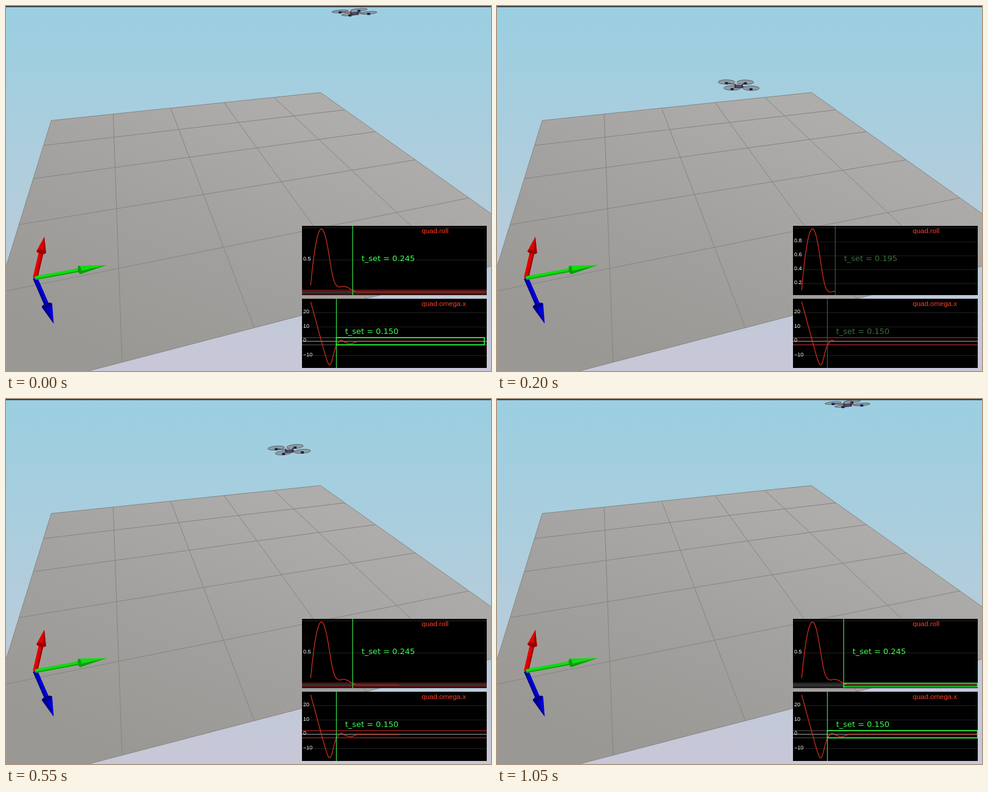
An HTML page with a canvas that plays this animation: 798 by 601 pixels, repeating every 1.1 s.

```html
<!DOCTYPE html>
<html lang="en">
<head>
<meta charset="utf-8">
<title>Quadcopter settling</title>
<style>
  html, body { margin: 0; width: 100%; height: 100%; overflow: hidden; background: #9acde0; }
  canvas { display: block; }
</style>
</head>
<body>
<canvas id="stage" width="798" height="601"></canvas>
<script>
const W = 798, H = 601, LOOP = 1100, TICK = 50, DT = .005;
const SANS = '"Liberation Sans", Arial, sans-serif';
const ctx = document.getElementById('stage').getContext('2d');

const clamp = (v, lo, hi) => Math.max(lo, Math.min(hi, v));
const mix = (a, b, k) => a + (b - a) * k;
const bell = (x, mid, width) => Math.exp(-(((x - mid) / width) ** 2));

const PACE = [[1, .015], [4, .195], [7, .335], [13, .67], [16, .82], [19, 1.005]];

function simTime(tick) {
  if (tick === 0) return .99;
  const step = tick - (tick > 4) - (tick > 14);   // two steps are held twice as long
  const i = PACE.findIndex(p => p[0] >= step);
  if (i === 0) return PACE[0][1];
  const [a, ta] = PACE[i - 1], [b, tb] = PACE[i];
  return Math.round(mix(ta, tb, (step - a) / (b - a)) / DT) * DT;
}

// Roll rate: constant braking that fades out, then a small wobble.
function omega(t) {
  const brake = (29.9 - 452 * t) / (1 + Math.exp((t - .126) / .01));
  return brake + 1.2 * bell(t, .177, .012) - 1.7 * bell(t, .23, .03);
}

// Integrate backwards from rest, so that the roll angle settles at zero.
const history = [];
for (let i = Math.round(1.1 / DT), roll = 0; i > 0; i--) {
  const t = i * DT;
  history.unshift({ t, roll, omega: omega(t) });
  roll -= 1.04 * DT * (omega(t) + omega(t - DT)) / 2;
}

const plots = [
  { top: 362, title: 'quad.roll', key: 'roll', band: .027, settle: .245 },
  { top: 482, title: 'quad.omega.x', key: 'omega', band: 2.5, settle: .15 }
];

function poly(pts, fill) {
  ctx.beginPath();
  pts.forEach(p => ctx.lineTo(p[0], p[1]));
  ctx.closePath();
  ctx.fillStyle = fill;
  ctx.fill();
}

function line(x0, y0, x1, y1, color, width = 1) {
  ctx.beginPath();
  ctx.moveTo(x0, y0);
  ctx.lineTo(x1, y1);
  ctx.strokeStyle = color;
  ctx.lineWidth = width;
  ctx.stroke();
}

function text(str, x, y, color, font) {
  ctx.font = font;
  ctx.fillStyle = color;
  ctx.fillText(str, x, y);
}

function gradient(x0, y0, x1, y1, ...colors) {
  const g = ctx.createLinearGradient(x0, y0, x1, y1);
  colors.forEach((c, i) => g.addColorStop(i / (colors.length - 1), c));
  return g;
}

// Perspective map of the unit square onto the floor.
function floorPoint(u, v) {
  const w = 1 + .1937 * u - .6119 * v;
  return [.5 + (74 + 543.1 * u - 101.3 * v) / w, .5 + (188 - 18.5 * u + 65.85 * v) / w];
}

function drawScene() {
  ctx.fillStyle = gradient(0, 0, 0, H, '#9acfe1', '#b1cddc', '#c9c7d7');
  ctx.fillRect(0, 0, W, H);
  poly([floorPoint(0, 0), floorPoint(1, 0), floorPoint(1, 1), floorPoint(0, 1)],
       gradient(430, 142, 250, 601, '#afadab', '#a3a19f', '#9a9894'));
  for (let k = 0; k <= 5; k++) {
    line(...floorPoint(k / 5, 0), ...floorPoint(k / 5, 1), '#868481');
    line(...floorPoint(0, k / 5), ...floorPoint(1, k / 5), '#868481');
  }
}

function drawArrow(neck, tip, shaft, cone, color, dark) {
  const [ox, oy] = [48, 448], [nx, ny] = neck;
  const dx = tip[0] - nx, dy = tip[1] - ny, len = Math.hypot(dx, dy);
  const px = -dy / len, py = dx / len;
  const at = (x, y, r) => [x + px * r, y + py * r];
  const rod = (from, to, fill) =>
    poly([at(ox, oy, from), at(nx, ny, from), at(nx, ny, to), at(ox, oy, to)], fill);
  rod(shaft, -shaft, color);
  rod(shaft, shaft * .4, dark);
  poly([at(nx, ny, cone), tip, at(nx, ny, -cone)], color);
  poly([at(nx, ny, cone), tip, at(nx, ny, cone * .3)], dark);
  ctx.beginPath();
  ctx.ellipse(nx, ny, cone, cone * .4, Math.atan2(py, px), 0, 7);
  ctx.fillStyle = dark;
  ctx.fill();
}

function drawAxes() {
  drawArrow([67.5, 493], [78.5, 523], 3.9, 9, '#0000cf', '#00008c');
  drawArrow([58, 405], [63, 380], 3.9, 8, '#df0000', '#9c0000');
  drawArrow([121, 434.5], [166, 426.5], 3.1, 7, '#10dc10', '#0b9e0b');
}

function drawDrone(t, phi) {
  const level = 1 - clamp(phi / .99, 0, 1);
  const climb = clamp((t - .195) / .625, 0, 1.3);
  const tilt = phi - .08, kick = 8 * bell(t, 0, .1);
  const ex = 15.5 * Math.cos(tilt), ey = 15.5 * Math.sin(tilt);
  const fx = mix(4, 4.7 + 2.6 * climb, level), fy = mix(5.2, 4.9 - 1.9 * climb, level);
  const tall = Math.max(.7, (4 - 1.5 * climb) * level);
  const hub = (i, j) => [i * ex + j * fx, i * ey + j * fy];
  const back = [hub(-1, -1), hub(1, -1)], front = [hub(-1, 1), hub(1, 1)];

  function rotor([x, y]) {
    ctx.beginPath();
    ctx.ellipse(x, y, 13.7, tall, tilt, 0, 7);
    ctx.fillStyle = 'rgba(138,152,156,.85)';
    ctx.fill();
    ctx.strokeStyle = '#566065';
    ctx.lineWidth = 1;
    ctx.stroke();
    ctx.fillStyle = '#1a1a58';
    ctx.fillRect(x - 2.5, y, 5, 3.5);
  }

  function arm([x, y], i) {
    line(0, 1, x, y + 1, '#3a3946', 1.3);
    line(0, 1, x * .6, y * .6 + 1, i ? '#8c4a36' : '#b0623a', 1.5);
  }

  ctx.save();
  ctx.translate(354.5 + 221 * t + kick, 160 - 151.5 * t - kick);
  back.forEach(rotor);
  back.forEach(arm);
  front.forEach(arm);
  front.forEach(rotor);
  ctx.rotate(tilt);
  ctx.fillStyle = '#35324c';
  ctx.fillRect(-7, -2, 14, 7);
  ctx.fillStyle = '#9a9eaa';
  ctx.fillRect(-5, -2, 10, 2);
  ctx.fillStyle = '#5c5874';
  ctx.fillRect(-4, 1.5, 8, 2);
  ctx.restore();
}

function tickStep(range) {
  const decade = 10 ** Math.floor(Math.log10(range)), m = range / decade;
  return decade * (m < 4 ? .5 : m < 8 ? 1 : 2);
}

function drawPlot({ top, title, key, band, settle }, now, past) {
  const left = 487, right = 791, bottom = top + 114;
  const vals = past.map(p => p[key]);
  const hi = Math.max(...vals), lo = Math.min(...vals), scale = 104 / (hi - lo);
  const toX = t => 499.8 + 290 * t;
  const toY = v => top + 5 + (hi - v) * scale;
  const rule = (v, color) => line(left, toY(v), right, toY(v), color, 1.2);

  ctx.save();
  ctx.beginPath();
  ctx.rect(left, top, right - left, 114);
  ctx.clip();
  ctx.fillStyle = '#000';
  ctx.fillRect(left, top, right - left, 114);

  const step = tickStep(114 / scale), digits = step < 1 ? Math.ceil(-Math.log10(step)) : 0;
  const ticks = [];
  for (let i = Math.ceil((lo - 5 / scale) / step); toY(i * step) > top; i++) ticks.push(i * step);
  ticks.forEach(v => rule(v, '#1e1e1e'));

  const done = now - settle >= .75, bright = now - settle > .1;
  rule(0, '#858585');
  [band, -band].forEach(v => rule(v, done ? '#4a4a4a' : '#b02626'));

  ctx.beginPath();
  past.forEach((p, i) => ctx.lineTo(toX(p.t), toY(vals[i])));
  ctx.strokeStyle = '#f03422';
  ctx.lineWidth = 1.1;
  ctx.lineJoin = 'round';
  ctx.stroke();

  const setAt = Math.min(now, settle), mark = Math.floor(toX(setAt)) + .5;
  const green = bright ? '#3cff50' : '#3c6e3c';
  line(mark, top, mark, bottom, green);
  if (done) {
    const end = Math.min(toX(now), right - .5);
    ctx.strokeStyle = '#28f53c';
    ctx.lineWidth = 1.7;
    ctx.strokeRect(mark, toY(band), end - mark, 2 * band * scale);
  }

  ticks.forEach(v => {
    const y = toY(v);
    if (y < top + 10 || y > bottom - 10) return;
    const sign = v < -1e-9 ? '\u2212' : '';
    text(sign + Math.abs(v).toFixed(digits), 489, y + 1, '#f4f4f4', '9px ' + SANS);
  });
  text(title, 684, top + 12, '#ff3c26', '11.5px ' + SANS);
  text('t_set = ' + setAt.toFixed(3), mark + 14.5, top + 57.5, green, '13px "DejaVu Sans", sans-serif');
  ctx.restore();
}

function draw(tick) {
  const now = simTime(tick);
  const past = history.slice(0, Math.round(now / DT));
  drawScene();
  drawDrone(now, past[past.length - 1].roll);
  drawAxes();
  ctx.fillStyle = '#3e4044';
  ctx.fillRect(0, 0, W, 2);
  plots.forEach(p => drawPlot(p, now, past));
}

const start = performance.now();
let shown = -1;
function loop() {
  const tick = Math.floor((performance.now() - start) % LOOP / TICK);
  if (tick !== shown) draw(shown = tick);
  requestAnimationFrame(loop);
}
loop();
</script>
</body>
</html>
```
